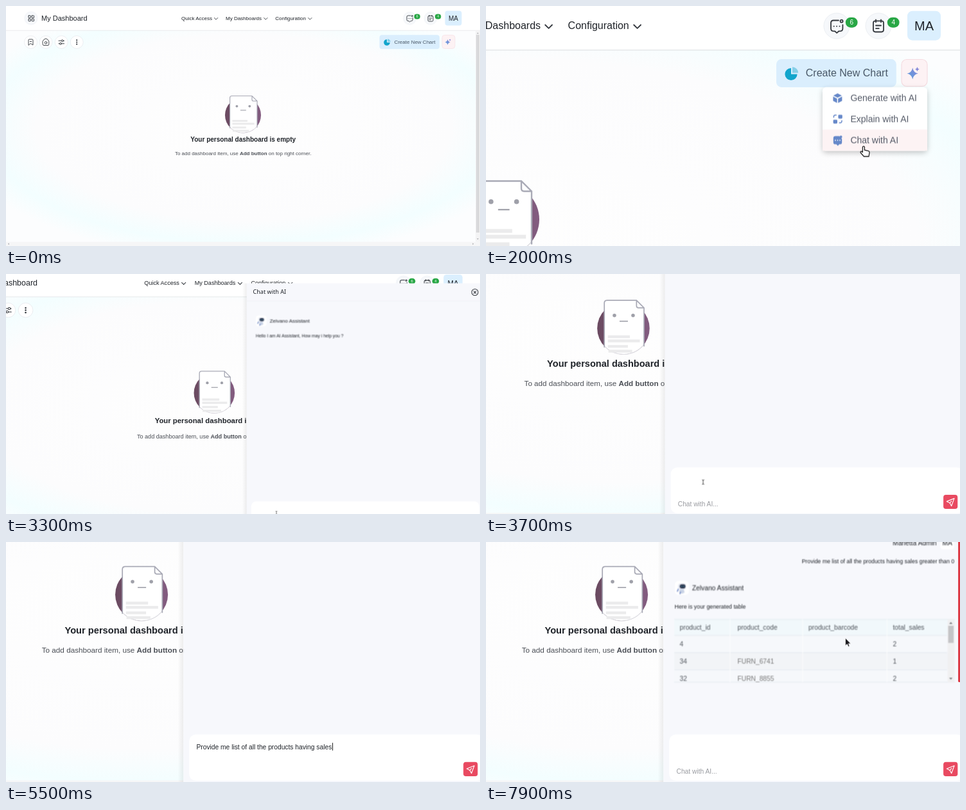
An HTML page for the animation above (8000 ms loop, 738 by 375 pixels).

```html
<!DOCTYPE html>
<html lang="en">
<head>
<meta charset="utf-8">
<title>Dashboard chat assistant</title>
<style>
html, body { margin: 0; width: 100%; height: 100%; overflow: hidden; background: #fdfdfe; }
svg { display: block; width: 738px; height: 375px; font-family: "Liberation Sans", Arial, sans-serif; }
text { white-space: pre; fill: #1f2329; }
.t6 { font-size: 6px; } .t7 { font-size: 7px; } .t8 { font-size: 8px; }
.line { fill: none; stroke: #33373d; stroke-width: .9; stroke-linecap: round; stroke-linejoin: round; }
.grey { fill: #777; } .cell { fill: #50555c; } .item { fill: #555b68; }
.mid { text-anchor: middle; } .end { text-anchor: end; }

#camera { animation: camera 8s cubic-bezier(.65,0,.35,1) infinite; }
@keyframes camera {
  0%, 10.625% { transform: translate(0px,0px) scale(1); }
  18.875%, 32.5% { transform: translate(-711px,-7.5px) scale(2); }
  41.25% { transform: translate(-94.5px,-7.6px) scale(1.135); animation-timing-function: ease-in-out; }
  46.9%, 100% { transform: translate(-329.5px,-167.5px) scale(1.465); }
}
#panel { animation: panel 8s ease-out infinite; }
@keyframes panel {
  0%, 33.75% { transform: translateX(340px); }
  36.5%, 100% { transform: translateX(0px); }
}
#pointer { animation: pointer 8s ease-in-out infinite; }
@keyframes pointer {
  0%, 6.25% { transform: translate(606px,215px); }
  11.5%, 20% { transform: translate(687.3px,55.3px); }
  24.375%, 33.125% { transform: translate(649.5px,113.3px); }
  40.6%, 91.875% { transform: translate(454.2px,335.4px); }
  96.875%, 100% { transform: translate(606.8px,216.7px); }
}
.step { animation: 8s step-end infinite; }
#arrow { animation-name: arrow; }
@keyframes arrow { 0% { opacity: 0 } 6.25% { opacity: 1 } 11% { opacity: 0 } 33.75% { opacity: 1 } 39.4% { opacity: 0 } 91.875%, 100% { opacity: 1 } }
#hand { animation-name: hand; }
@keyframes hand { 0% { opacity: 0 } 11% { opacity: 1 } 33.75%, 100% { opacity: 0 } }
#beam { animation-name: beam; }
@keyframes beam { 0% { opacity: 0 } 39.4% { opacity: 1 } 52.5%, 100% { opacity: 0 } }
#focus { animation-name: focus; }
@keyframes focus { 0% { opacity: 0 } 11.25% { opacity: 1 } 18.75%, 100% { opacity: 0 } }
#menu { animation-name: menu; }
@keyframes menu { 0% { opacity: 0 } 18.75% { opacity: 1 } 32.5%, 100% { opacity: 0 } }
#hover { animation-name: hover; }
@keyframes hover { 0% { transform: translateY(-33px) } 21.6% { transform: translateY(-16.5px) } 23%, 100% { transform: translateY(0px) } }
#hint { animation-name: hint; }
@keyframes hint { 0% { opacity: 1 } 47.5% { opacity: 0 } 78.1%, 100% { opacity: 1 } }
#sent { animation-name: sent; }
@keyframes sent { 0% { opacity: 0 } 78.1%, 100% { opacity: 1 } }
#wait { animation-name: wait; }
@keyframes wait { 0% { opacity: 0 } 78.1% { opacity: 1 } 92.5%, 100% { opacity: 0 } }
#loading { animation-name: loading; }
@keyframes loading { 0% { opacity: 0 } 79.5% { opacity: 1 } 92.5%, 100% { opacity: 0 } }
.reply { animation-name: reply; }
@keyframes reply { 0% { opacity: 0 } 92.5%, 100% { opacity: 1 } }
#log { animation-name: log; }
@keyframes log { 0% { transform: translateY(0px) } 92.5%, 100% { transform: translateY(-5.1px) } }
#mine { animation-name: mine; }
@keyframes mine { 0% { transform: translateX(0px) } 92.5%, 100% { transform: translateX(-2.4px) } }
#wait circle { fill: #f3a0b3; animation: pulse 1s ease-in-out infinite; }
#wait circle:nth-child(2) { animation-delay: -.85s; }
#wait circle:nth-child(3) { animation-delay: -.7s; }
@keyframes pulse { 0%, 100% { opacity: .95 } 50% { opacity: .4 } }
</style>
</head>
<body>
<svg viewBox="0 0 738 375">
<defs>
  <radialGradient id="glow" gradientUnits="userSpaceOnUse" cx="0" cy="0" r="1.3" gradientTransform="translate(369 190) scale(400 180)">
    <stop offset="0" stop-color="#fefefe"/><stop offset=".62" stop-color="#fcfcfd"/>
    <stop offset=".77" stop-color="#f3feff"/><stop offset=".88" stop-color="#fcfdfe"/>
  </radialGradient>
  <linearGradient id="plum"><stop offset="0" stop-color="#6a4a60"/><stop offset="1" stop-color="#835c80"/></linearGradient>
  <linearGradient id="edge"><stop offset="0" stop-color="#555" stop-opacity="0"/><stop offset="1" stop-color="#555" stop-opacity=".1"/></linearGradient>
  <linearGradient id="spark" x1="0" y1="1" x2="1" y2="0"><stop offset="0" stop-color="#58a0dc"/><stop offset="1" stop-color="#8f84d8"/></linearGradient>
  <filter id="soft" x="-20%" y="-20%" width="140%" height="150%"><feDropShadow dx="0" dy="1.5" stdDeviation="2" flood-opacity=".22"/></filter>
  <clipPath id="logArea"><rect x="413" y="44" width="325" height="272"/></clipPath>
  <path id="chevron" class="line" d="M-2.7-1.3 0 1.4 2.7-1.3"/>
  <g id="bot">
    <rect x="-7.5" y="-7.5" width="15" height="15" rx="4" fill="#fff"/>
    <path d="M-2.6 1.5h4.6l.8 3.4-2.6 1.2-3-1.4z" fill="#c9d3e6"/>
    <rect x="-3.8" y="-4.6" width="8" height="6" rx="2.8" fill="#dfe5f1"/>
    <rect x="-2.2" y="-3.8" width="6" height="4.2" rx="2" fill="#242b40"/>
    <circle cx="-.2" cy="-1.7" r=".55" fill="#69cdf0"/><circle cx="2" cy="-1.7" r=".55" fill="#69cdf0"/>
    <path d="M-3.8 1.2l-1 2.4M-1.5 4.6l-.5 1.6" stroke="#5b78bf" stroke-width="1" stroke-linecap="round"/>
  </g>
</defs>
<g id="camera">
  <rect width="738" height="375" fill="url(#glow)"/>

  <!-- top bar -->
  <rect width="738" height="38" fill="#fff"/>
  <path d="M0 38.2H738" stroke="#e2e3e6" stroke-width=".7"/>
  <g fill="#f6f8fb" stroke="#eceff3" stroke-width=".5"><circle cx="39" cy="19" r="10.3"/><circle cx="628.5" cy="19.3" r="10"/><circle cx="661" cy="19.3" r="10"/></g>
  <g class="line">
    <rect x="35" y="15" width="3.4" height="3.4" rx=".4"/><rect x="40.2" y="15" width="3.4" height="3.4" rx=".4"/>
    <rect x="35" y="20.2" width="3.4" height="3.4" rx=".4"/><rect x="40.2" y="20.2" width="3.4" height="3.4" rx=".4"/>
    <path d="M630 15h-4q-2 0-2 2v4.4q0 2 2 2h1l1.6 1.4 1.6-1.4h1q2 0 2-2v-3"/><circle cx="632.3" cy="15.6" r="1"/>
    <path d="M626.3 19.6h.1M628.5 19.6h.1M630.7 19.6h.1"/>
    <rect x="657" y="15.4" width="8" height="8.6" rx="1.6"/><path d="M659 14.4v2M663 14.4v2M659 19h4M659 21.3h2.4"/>
  </g>
  <text x="55" y="22.9" font-size="11">My Dashboard</text>
  <text x="273" y="21.8" class="t8">Quick Access</text><use href="#chevron" x="327" y="19.8"/>
  <text x="342" y="21.8" class="t8">My Dashboards</text><use href="#chevron" x="404.3" y="19.8"/>
  <text x="419.3" y="21.8" class="t8">Configuration</text><use href="#chevron" x="473.3" y="19.8"/>
  <g fill="#28a745"><rect x="635.4" y="12.6" width="9.4" height="8" rx="4"/><rect x="667.9" y="12.6" width="9.4" height="8" rx="4"/></g>
  <g font-size="5" class="mid"><text x="640.1" y="18.4" style="fill:#fff">6</text><text x="672.6" y="18.4" style="fill:#fff">4</text></g>
  <rect x="683.5" y="7.6" width="26" height="23" rx="4" fill="#dbeffe"/>
  <text x="696.5" y="22.7" font-size="10" class="mid">MA</text>

  <!-- tools -->
  <g fill="#fff" stroke="#e6e7ec" stroke-width=".7"><circle cx="38.5" cy="56.5" r="10"/><circle cx="62" cy="56.5" r="10"/><circle cx="86.3" cy="56.5" r="10"/><circle cx="110.2" cy="56.5" r="10"/></g>
  <g class="line">
    <path d="M35 61V53.2q0-1.2 1.2-1.2h4.6q1.2 0 1.2 1.2V61l-3.5-2.3zM37.3 55.5h2.4"/>
    <path d="M57.2 55.2l1.6-2.6 3.2-1.8 3.2 1.8 1.6 2.6v4.6q0 1.8-1.8 1.8h-6q-1.8 0-1.8-1.8z"/><circle cx="62" cy="57.4" r="1.8"/>
    <path d="M82 54.3h4M89.4 54.3h1.2M82 58.8h1.2M86.6 58.8h4"/><circle cx="87.7" cy="54.3" r="1.5"/><circle cx="84.9" cy="58.8" r="1.5"/>
  </g>
  <g fill="#33373d"><circle cx="110.2" cy="53.3" r="1.1"/><circle cx="110.2" cy="56.5" r="1.1"/><circle cx="110.2" cy="59.7" r="1.1"/></g>
  <rect x="581.5" y="45.3" width="93.4" height="21.9" rx="4" fill="#daeefd"/>
  <path d="M593 57V52.2A4.8 4.8 0 1 0 597.8 57z" fill="#12a5cc"/><path d="M594 56V51.4A4.6 4.6 0 0 1 598.6 56z" fill="#86cfe8"/>
  <text x="604.4" y="58.9" class="t8" style="fill:#495867">Create New Chart</text>
  <rect x="679" y="45.5" width="20" height="21" rx="4" fill="#fdf2f4" stroke="#f5dce1" stroke-width=".6"/>
  <rect id="focus" class="step" x="679.2" y="45.4" width="19.7" height="20.8" rx="4" fill="#fbf8fc" stroke="#8687a8" stroke-width=".7"/>
  <path d="M687.6 52q.7 3.8 4.3 4.5-3.6.7-4.3 4.5-.7-3.8-4.3-4.5 3.6-.7 4.3-4.5zM691.2 51.4q.3 1.4 1.7 1.7-1.4.3-1.7 1.7-.3-1.4-1.7-1.7 1.4-.3 1.7-1.7z" fill="url(#spark)"/>

  <!-- empty state -->
  <circle cx="369" cy="170.5" r="28" fill="url(#plum)"/>
  <path d="M348.6 189.5V143.5q0-3 3-3H383l8 8V187.8A28 28 0 0 1 348.6 189.5z" fill="#fff"/>
  <path d="M391 187.8A28 28 0 0 1 348.6 189.5" fill="none" stroke="#dcdce1" stroke-width=".7"/>
  <path d="M348.6 191V143.5q0-3 3-3H383l8 8V190M383 140.5v5.8q0 2.2 2.2 2.2H391" fill="none" stroke="#a9aab6" stroke-width="1.2"/>
  <g fill="#9fa0a9"><circle cx="359.4" cy="156.6" r="1.9"/><circle cx="379.3" cy="156.6" r="1.9"/><rect x="364.9" y="162.3" width="8.9" height="1.1"/></g>
  <g fill="#ebebec"><rect x="352.4" y="178" width="23.5" height="3"/><rect x="352.4" y="182.5" width="34.2" height="3"/><rect x="352.4" y="188.4" width="21.4" height="2.9"/><rect x="353" y="193.5" width="25.4" height="3"/></g>
  <text x="369.2" y="212" font-size="10" font-weight="700" class="mid">Your personal dashboard is empty</text>
  <text x="369.2" y="232.7" class="t8 mid" style="fill:#4a4e55">To add dashboard item, use <tspan font-weight="700">Add button</tspan> on top right corner.</text>

  <!-- page scrollbars -->
  <rect x="731" y="38.5" width="7" height="330" fill="#f4f4f5"/><rect x="732" y="45" width="5" height="309" fill="#d9d9db"/>
  <rect y="368.5" width="738" height="6.5" fill="#f6f6f7"/>
  <path d="M733 43.2l1.5-1.8 1.5 1.8zM733 363.2l1.5 1.8 1.5-1.8zM4.8 370.2l-1.8 1.5 1.8 1.5zM726.5 370.2l1.8 1.5-1.8 1.5z" fill="#a5a5a8"/>

  <g id="menu" class="step">
    <rect x="617.5" y="63.5" width="81.5" height="49.7" transform="translate(0 3.8)" rx="3" fill="#fff" filter="url(#soft)"/>
    <rect id="hover" class="step" x="617.5" y="100.3" width="81.5" height="16.5" fill="#fdf3f4"/>
    <g fill="#6688c9">
      <path d="M629.2 72l3.3 1.7-3.3 1.7-3.3-1.7zM625.7 74.5l3.1 1.6v3.4l-3.1-1.6zM632.7 74.5l-3.1 1.6v3.4l3.1-1.6z"/>
      <rect x="629.7" y="88.7" width="3.2" height="3" rx=".7"/><rect x="625.8" y="92.6" width="3.2" height="3" rx=".7"/>
      <path d="M626.2 91v-.8q0-1.2 1.2-1.2h1M632.5 93v.8q0 1.2-1.2 1.2h-1" fill="none" stroke="#6688c9" stroke-width=".7"/>
      <path d="M630.6 105.4h-3q-1.7 0-1.7 1.6v3.2q0 1.6 1.7 1.6h.6l1.2 1.2 1.2-1.2h.4q1.6 0 1.6-1.6v-2.6z"/><circle cx="631.8" cy="106" r="1"/>
    </g>
    <path d="M627.4 108.7h.1M629.2 108.7h.1M631 108.7h.1" stroke="#fff" stroke-width=".8" stroke-linecap="round"/>
    <g class="t7"><text x="639.2" y="74.2" dy="3.8" class="item">Generate with AI</text><text x="639.2" y="94.5" class="item">Explain with AI</text><text x="639.2" y="111" class="item">Chat with AI</text></g>
  </g>

  <!-- chat -->
  <g id="panel">
    <rect x="407.5" y="19.5" width="6" height="356" fill="url(#edge)"/>
    <rect x="413.5" y="19.5" width="325" height="360" fill="#f7f8fc"/>
    <path d="M413.5 43.8H738" stroke="#eceef3" stroke-width=".7"/>
    <text x="422" y="34.3" font-size="8" font-weight="500" style="font-family:'Noto Sans','Open Sans',sans-serif">Chat with AI</text>
    <circle class="line" cx="726.5" cy="31.8" r="4.4"/><path class="line" d="M724.9 30.2l3.2 3.2M728.1 30.2l-3.2 3.2"/>
    <g clip-path="url(#logArea)">
      <g id="log" class="step">
        <use href="#bot" x="433.3" y="71.2"/><text x="445" y="73.6" class="t7">Zelvano Assistant</text>
        <text x="426" y="93.8" class="t6">Hello I am AI Assistant, How may i help you ?</text>
        <g id="sent" class="step">
          <g id="mine" class="step">
            <text x="706.2" y="122.6" class="t7 end">Marietta Admin</text>
            <rect x="710.2" y="112.8" width="14.6" height="14.6" rx="3" fill="#fff"/><text x="717.5" y="122.6" class="t7 mid">MA</text>
            <text x="725.1" y="142" class="t6 end">Provide me list of all the products having sales greater than 0</text>
          </g>
          <use href="#bot" x="433.1" y="168.4"/><text x="444" y="171.1" class="t7">Zelvano Assistant</text>
        </g>
        <g id="wait" class="step"><circle cx="429.1" cy="188" r="1.4"/><circle cx="439.6" cy="188" r="1.4"/><circle cx="450.2" cy="188" r="1.4"/></g>
        <g class="step reply">
          <text x="425.3" y="190.5" class="t6">Here is your generated table</text>
          <rect x="425" y="202" width="290.5" height="17" fill="#f1f8fb"/><rect x="425" y="219" width="290.5" height="18.4" fill="#f6f8fb"/>
          <rect x="425" y="237.4" width="290.5" height="18.4" fill="#f2f4f7"/><rect x="425" y="255.8" width="290.5" height="13.1" fill="#f6f8fb"/>
          <path d="M425 202H723M425 219H715M425 237.4H715M425 255.8H715M425 268.9H723" stroke="#e2e9ee" stroke-width=".6"/>
          <path d="M484.3 202v67M561.4 202v67M651 202v67" stroke="#fff" stroke-width=".6"/>
          <g id="cells" class="t7"></g>
          <rect x="715.5" y="202" width="7.5" height="67" fill="#f0f0f1"/><rect x="716.1" y="208.8" width="5.7" height="18.2" fill="#c4c4c6"/>
          <path d="M717.2 206.8l1.7-2 1.7 2zM717.2 264.2l1.7 2 1.7-2z" fill="#77797d"/>
        </g>
      </g>
    </g>
    <rect class="step reply" x="726.7" y="44" width="3" height="219.8" rx="1" fill="#dc3540"/>
    <rect x="419.6" y="319.7" width="313" height="49.3" rx="7" fill="#fff"/>
    <text id="hint" class="step t7" x="427.3" y="361.2" style="fill:#9a9ca1">Chat with AI...</text>
    <text id="typed" class="t7" x="427.3" y="335.2"></text>
    <rect id="caret" y="328.5" width=".7" height="8.2" fill="#222"/>
    <rect x="711" y="349" width="15.2" height="15.2" rx="2.6" fill="#e94a61"/>
    <path d="M714.6 356.2l8-3.3-3 8.2-1.7-3.3zM717.9 357.8l2-2.2" fill="none" stroke="#fff" stroke-width=".8" stroke-linejoin="round"/>
    <g id="loading" class="step"><rect x="708.4" y="360.6" width="30" height="15" fill="#71639e"/><text x="710.2" y="370.2" class="t7" style="fill:#fff">Loading</text></g>
  </g>

  <g id="pointer" stroke-linejoin="round">
    <path id="arrow" class="step" d="M0 0V8.2L1.9 6.5 3.2 9.3 4.5 8.7 3.3 6H5.8z" fill="#1b1b1f" stroke="#fff" stroke-width=".5"/>
    <path id="hand" class="step" d="M-.8.6q.8-1.1 1.5 0V3l3 .7q.9.3.8 1.3L4 8H.2L-2.4 5q-.3-1 .7-1l.9.7z" fill="#fff" stroke="#222" stroke-width=".65"/>
    <path id="beam" class="step" d="M-1.2-2.4Q0-2.4 0-1.8 0-2.4 1.2-2.4M0-1.8V1.8M-1.2 2.4Q0 2.4 0 1.8 0 2.4 1.2 2.4" fill="none" stroke="#333" stroke-width=".6"/>
  </g>
</g>
</svg>
<script>
const byId = id => document.getElementById(id);

const columns = [430.7, 492.1, 567.6, 657.3];
const rows = [
  ["product_id", "product_code", "product_barcode", "total_sales"],
  ["4", "", "", "2"],
  ["34", "FURN_6741", "", "1"],
  ["32", "FURN_8855", "", "2"]
];
byId("cells").innerHTML = rows.map((row, r) => row.map((value, c) => {
  const y = r ? 212.1 + 18.4 * r : 212.7;
  return `<text x="${columns[c]}" y="${y}" class="${r && c === 1 ? "grey" : "cell"}">${value}</text>`;
}).join("")).join("");

const LOOP = 8000, FOCUS = 3800, TYPE = 4200, SEND = 6250, PER_CHAR = 27;
const prompt = "Provide me list of all the products having sales greater than 0";
const typed = byId("typed"), caret = byId("caret");
let start;

function draw(now) {
  start ??= now;
  const t = (now - start) % LOOP;
  const editing = t >= FOCUS && t < SEND;
  const count = editing ? Math.max(0, Math.floor((t - TYPE) / PER_CHAR)) : 0;
  typed.textContent = prompt.slice(0, count);
  caret.setAttribute("x", 427.8 + (count ? typed.getComputedTextLength() : 0));
  caret.setAttribute("opacity", editing ? 1 : 0);
  requestAnimationFrame(draw);
}
requestAnimationFrame(draw);
</script>
</body>
</html>
```
